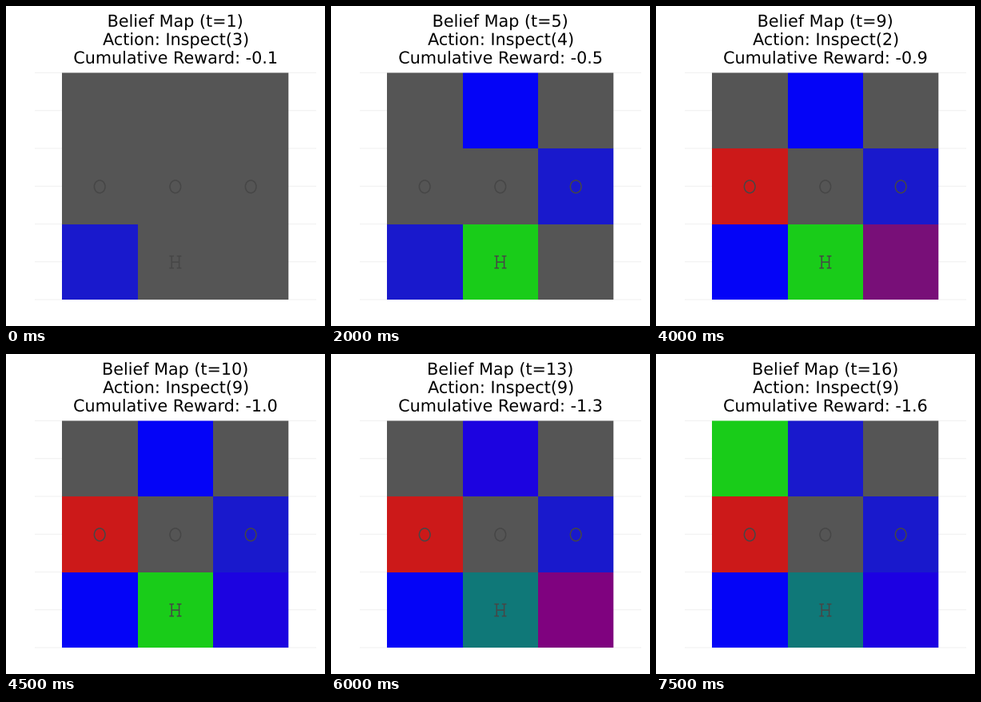
These frames come from a looping animation (399x400 px, 8 s). A matplotlib script:

```python
import numpy as np
import matplotlib.pyplot as plt
from matplotlib.animation import FuncAnimation
from matplotlib.patches import Ellipse, PathPatch, Rectangle
from matplotlib.textpath import TextPath
from matplotlib.transforms import Affine2D

W, H, DPI = 399, 400, 64
PT = 72 / DPI  # points per pixel
INK = "#464646"
XS = [70, 165, 259, 353.3]
YS = [83.5, 178, 273, 367]
MID = 211.8
BASELINES = (25.9, 48.8, 71.8)

# Cells count down the columns; each inspection reports one colour.
INSPECTIONS = [
    (3, "b"), (4, "b"), (8, "b"), (6, "g"),
    (4, "b"), (3, "b"), (9, "b"), (9, "r"),
    (2, "r"), (9, "b"), (4, "r"), (6, "b"),
    (9, "r"), (1, "g"), (4, "g"), (9, "b"),
]
ACCURACY = 0.8
STEP_COST = 0.1


def beliefs(t):
    """RGB belief of the nine cells after t inspections."""
    cells = np.full((9, 3), 1 / 3)
    for cell, seen in INSPECTIONS[:t]:
        likelihood = np.full(3, (1 - ACCURACY) / 2)
        likelihood["rgb".index(seen)] = ACCURACY
        cells[cell - 1] *= likelihood
        cells[cell - 1] /= cells[cell - 1].sum()
    return cells


def centred_text(line, baseline):
    """Unhinted outline of a line, its ink centred on the map."""
    path = TextPath((0, 0), line, size=20.7, prop={"family": "DejaVu Sans"})
    box = path.get_extents()
    shift = MID - (box.x0 + box.x1) / 2
    return Affine2D().scale(1, -1).translate(shift, baseline).transform_path(path)


fig = plt.figure(figsize=(W / DPI, H / DPI), dpi=DPI, facecolor="white")
ax = fig.add_axes([0, 0, 1, 1])
ax.set(xlim=(0, W), ylim=(H, 0))
ax.axis("off")


def stroke(xs, ys, color=INK, width=1.5, zorder=2):
    ax.plot(xs, ys, color=color, lw=width * PT, solid_capstyle="butt",
            snap=False, zorder=zorder)


def slab_h(x, y):
    for side in (-1, 1):
        stem = x + side * 4.7
        stroke([stem, stem], [y - 7.5, y + 7.5])
        for end in (-7.5, 7.5):
            stroke([stem - 2.8, stem + 2.8], [y + end, y + end])
    stroke([x - 4.7, x + 4.7], [y, y])


for y in np.linspace(83.5, 367, 7):
    stroke([36, 388], [y, y], color="#f0f0f0", width=1, zorder=0)

tiles = []
for col in range(3):
    for row in range(3):
        tile = Rectangle((XS[col], YS[row]), XS[col + 1] - XS[col],
                         YS[row + 1] - YS[row], lw=0, snap=False, zorder=1)
        tiles.append(ax.add_patch(tile))

for x in (117.2, 211.8, 306.2):
    ax.add_patch(Ellipse((x, 225.8), 13.6, 15.8, fill=False, ec=INK,
                         lw=1.5 * PT, zorder=2))
slab_h(211.9, 320.1)

title = [ax.add_patch(PathPatch(centred_text("-", y), fc="black", lw=0,
                                snap=False))
         for y in BASELINES]


def update(i):
    t = i + 1
    for tile, color in zip(tiles, beliefs(t)):
        tile.set_facecolor(color)
    lines = (f"Belief Map (t={t})",
             f"Action: Inspect({INSPECTIONS[i][0]})",
             f"Cumulative Reward: {-STEP_COST * t:.1f}")
    for label, line, y in zip(title, lines, BASELINES):
        label.set_path(centred_text(line, y))
    return [*tiles, *title]


anim = FuncAnimation(fig, update, frames=len(INSPECTIONS), interval=500,
                     repeat=True, repeat_delay=0)
plt.show()
```
